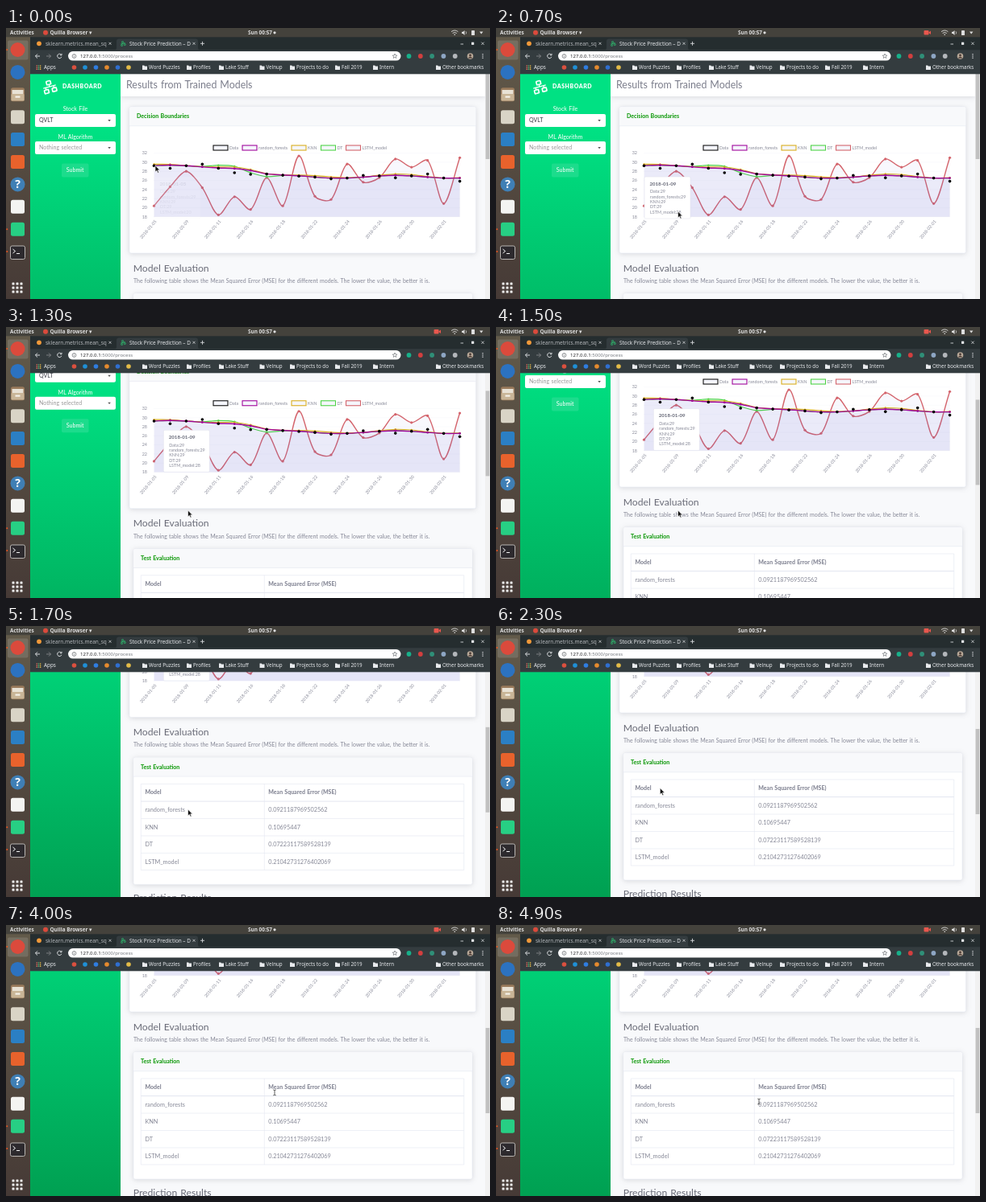
Write an HTML page that moves like this. It is 600 by 337 pixels and loops after 5000 ms.

```html
<!DOCTYPE html>
<html lang="en">
<head>
<meta charset="utf-8">
<title>Dashboard</title>
<style>
html, body { margin: 0; width: 100%; height: 100%; overflow: hidden; background: #f8f9fb; }
svg { display: block; width: 100vw; height: 100vh; }
text { white-space: pre; }
.page text { font-family: Lato, sans-serif; word-spacing: .07em; }
.ui text { font-family: "Noto Sans", "Open Sans", sans-serif; }
.card { filter: drop-shadow(0 1px 3px rgba(58, 59, 69, .17)); }
</style>
</head>
<body>
<svg id="stage" viewBox="0 0 600 337" preserveAspectRatio="none"></svg>
<script>
const LOOP = 5000, STEP = 100;
const GREY = '#858796', LINE = '#e3e6f0', GREEN = '#1a9e16', PAPER = '#f8f9fb';

// markup helpers; y of a text is the middle of its capitals
const text = (x, y, s, size, fill, more = '') =>
  `<text x="${x}" y="${(y + size * .35).toFixed(2)}" font-size="${size}" fill="${fill}" ${more}>${s}</text>`;
const rect = (x, y, w, h, fill, more = '') =>
  `<rect x="${x}" y="${y}" width="${w}" height="${h}" fill="${fill}" ${more}/>`;
const dot = (x, y, r, fill, more = '') =>
  `<circle cx="${x}" cy="${y}" r="${r}" fill="${fill}" ${more}/>`;
const path = (d, stroke, w = 1, more = '') =>
  `<path d="${d}" fill="none" stroke="${stroke}" stroke-width="${w}" ${more}/>`;
const each = (list, fn) => list.map(fn).join('');
const times = (n, fn) => Array.from({ length: n }, (_, i) => fn(i));
const MID = 'text-anchor="middle"', END = 'text-anchor="end"', BOLD = 'font-weight="800"';

const grid9 = (x, y, gap, size, fill) => times(9, i =>
  rect(x + i % 3 * gap, y + Math.floor(i / 3) * gap, size, size, fill(i % 3), 'rx=".6"')).join('');

function nodes(x, y, k, color) {
  const box = (a, b) => rect(a - 2.6, b - 2.2, 5.2, 4.4, 'none', `rx=".7" stroke="${color}" stroke-width="1.7"`);
  return `<g transform="translate(${x} ${y}) rotate(-15) scale(${k})">` +
    path('M0-3V0M-5 3V0H5V3M-8 0H8', color, 1.3) + box(0, -5) + box(-5, 5) + box(5, 5) + '</g>';
}

// ---- chart ----
const COUNT = 20, X0 = 183.5, DX = 19.95, BASE = 234.7, UNIT = 5.65;
const px = i => X0 + i * DX;
const py = v => BASE - (v - 18) * UNIT;

// a price level that drops once, around index mid, with a slow ripple
const trend = (i, mid) => 172.3 + 12.7 / (1 + Math.exp(2 * (mid - i))) - 1.8 * Math.cos(2 * Math.PI * (i - 1) / 7);
const forest = times(COUNT, i => trend(i, 6.3));
const data = times(COUNT, i => trend(i, 5.5) + 4 * Math.sin(Math.PI * i / 2) * Math.cos(Math.PI * i / 19));
const knn = forest.map((y, i) => y - 1.8 * Math.cos(.6 * (i - 5)) ** 2);
const tree = forest.map((y, i) => y + 6 * Math.sin(1.05 * (i - 5.5)) * Math.exp(-(((i - 5.5) / 2) ** 2)));
const lstm = [20.4, 24.6, 28, 24.4, 18.4, 22.4, 19.6, 26.6, 20.4, 31.4,
  22.5, 21.8, 29.6, 25.6, 26.6, 30.7, 28.9, 30.4, 20.9, 31].map(py);

function curve(ys) {
  const at = i => [px(i), ys[i]];
  const last = ys.length - 1;
  const control = (i, side) => {
    const p = at(Math.max(i - 1, 0)), c = at(i), n = at(Math.min(i + 1, last));
    const a = Math.hypot(c[0] - p[0], c[1] - p[1]), b = Math.hypot(n[0] - c[0], n[1] - c[1]);
    const f = .3 * (side < 0 ? -a : b) / (a + b);
    return [c[0] + f * (n[0] - p[0]), c[1] + f * (n[1] - p[1])];
  };
  let d = 'M' + at(0);
  for (let i = 0; i < last; i++) d += `C${control(i, 1)} ${control(i + 1, -1)} ${at(i + 1)}`;
  return d;
}
function series(ys, color, w, r) {
  const d = curve(ys);
  return `<path d="${d}V${BASE}H${X0}Z" fill="rgba(90,105,200,.042)"/>` + path(d, color, w) +
    each(ys, (y, i) => dot(px(i), y, r, color));
}

function chart() {
  let s = '';
  for (let v = 18; v <= 32; v += 2) {
    s += path(`M${X0} ${py(v)}H562.5`, '#eaecf4', .5, 'stroke-dasharray="1 1"') +
      text(175, py(v), v, 5.4, GREY, END);
  }
  const days = ['01-05', '01-09', '01-11', '01-16', '01-18', '01-22', '01-24', '01-26', '01-30', '02-01'];
  s += each(days, (d, i) => {
    const x = px(i * 2) + 2;
    return text(x, 239.5, '2018-' + d, 5.3, GREY, `${END} transform="rotate(-50 ${x} 239.5)"`);
  });
  const keys = [[257, 'Data', '#111'], [293, 'random_forests', '#a0069c'], [354, 'KNN', '#d9ae1e'],
    [390.5, 'DT', '#4fd447'], [421.5, 'LSTM_model', '#d4646c']];
  s += each(keys, ([x, name, c]) =>
    rect(x, 146, 18, 6, '#f5f6fd', `stroke="${c}" stroke-width="1.1"`) + text(x + 20, 149, name, 5.3, GREY));
  return s + series(lstm, '#d4646c', 1.4, 1.6) + series(tree, '#4fd447', 1.2, 1.2) +
    series(knn, '#d9ae1e', 1.2, 1.2) + series(forest, '#a0069c', 1.4, 1.4) +
    each(data, (y, i) => dot(px(i), y, 1.8, '#000'));
}

function tooltip() {
  return '<g id="tip">' + rect(0, 0, 57, 52, '#fff', 'rx="1.5" stroke="#dddfeb" stroke-width=".5"') +
    text(6.5, 8.5, '', 6.1, '#6e707e', `id="tipDay" ${BOLD}`) +
    times(5, i => text(7, 18.5 + i * 6.3, '', 5.4, GREY, `id="tip${i}"`)).join('') + '</g>';
}

// ---- scrolled page ----
function sidebar() {
  const select = (y, name, color) => rect(36, y, 100, 16, '#fff', 'rx="2"') +
    text(41, y + 8, name, 7.1, color) + `<path d="M126.3 ${y + 7}h3.6l-1.8 2.2z" fill="#555"/>`;
  return rect(30, 57, 112, 700, 'url(#side)') + nodes(54, 73, 1, '#fff') +
    text(70, 72.5, 'DASHBOARD', 7, '#fff', 'font-weight="900" letter-spacing=".5"') +
    text(86, 101, 'Stock File', 7.1, '#fff', MID) + select(107, 'QVLT', '#3a3b45') +
    text(86, 135.5, 'ML Algorithm', 7.1, '#fff', MID) + select(141, 'Nothing selected', '#999') +
    rect(69, 168.5, 33.5, 17, '#1cdc8c', 'rx="2"') + text(85.7, 177, 'Submit', 7.1, '#fff', MID);
}

function card(x, y, w, h, title, tx) {
  return `<g class="card">${rect(x, y, w, h, '#fff', `rx="2" stroke="${LINE}" stroke-width=".5"`)}</g>` +
    rect(x + .3, y + .3, w - .6, 23.2, PAPER, 'rx="2"') +
    path(`M${x} ${y + 23.7}H${x + w}`, LINE, .6) + text(tx, y + 12, title, 7.05, GREEN, BOLD);
}

function table() {
  const rows = [['random_forests', '0.0921187969502562'], ['KNN', '0.10695447'],
    ['DT', '0.07223117589528139'], ['LSTM_model', '0.21042731276402069']];
  const head = 384.6, rh = 21.45;
  const cells = (y, a, b, size, more) => text(172.5, y, a, size, GREY, more) + text(325.3, y, b, size, GREY, more);
  return path('M167.3 363H567.7V470H167.3ZM320.3 363V470', LINE, .6) +
    cells(373.5, 'Model', 'Mean Squared Error (MSE)', 7, BOLD) +
    each(rows, ([a, b], i) => path(`M167.3 ${head + i * rh}H567.7`, LINE, i ? .6 : 1) +
      cells(head + (i + .5) * rh, a, b, 7.25));
}

function page() {
  const heading = (y, s) => text(157.7, y, s, 12.2, '#6a6c78');
  return rect(142, 57, 452, 700, PAPER) +
    `<g class="card">${rect(142, 57, 452, 28, '#fff')}</g>` + sidebar() +
    text(149, 71, 'Results from Trained Models', 12.4, '#7b7d8b') +
    card(153, 98, 429.5, 182, 'Decision Boundaries', 162) + chart() + tooltip() +
    heading(298.3, 'Model Evaluation') +
    text(158, 314.5, 'The following table shows the Mean Squared Error (MSE) for the different models. The lower the value, the better it is.', 6.95, GREY) +
    card(158, 330, 420, 158, 'Test Evaluation', 167) + table() + heading(504.5, 'Prediction Results');
}

// ---- desktop and browser ----
function dock() {
  const at = i => 27 + i * 27.9;
  const tile = (i, c) => rect(6, at(i) - 8.5, 17, 17, c, 'rx="2.5"');
  return rect(0, 11, 30, 326, 'url(#dock)') + rect(2, 15.5, 25.5, 24, '#fff', 'rx="2" opacity=".13"') +
    dot(14.5, at(0), 9, '#db4a3c') + dot(14.5, at(1), 9, '#2c72c0') +
    tile(2, '#9a7b5c') + rect(7.5, 77, 14, 5.5, '#e9e2d5') + rect(6.5, 82, 16, 8.5, '#c9b597', 'rx="1"') +
    rect(11.5, 84.5, 6, 2.2, '#f5f1e8') +
    tile(3, '#d9d4c6') + tile(4, '#2b7fc4') + tile(5, '#e8622c') +
    dot(14.5, at(6), 9, '#3f7fb5') + text(14.5, at(6), '?', 14, '#fff', `${MID} ${BOLD}`) +
    tile(7, '#f4f4f2') + tile(8, '#27cf84') +
    rect(5.5, 271, 18, 16.5, '#2d2a2e', 'rx="2" stroke="#b8b5b2" stroke-width="1"') +
    path('M8.5 275l3 2.5l-3 2.5M13 280.5h4', '#fff', 1) +
    each([0, 8, 9], i => dot(1.3, at(i), 1, '#e95420')) + grid9(7.5, 316.5, 5, 3, () => '#eee');
}

function topBar() {
  const c = '#dedede';
  const label = (x, s) => text(x, 5.8, s, 6.4, c, 'font-weight="600"');
  return rect(0, 0, 600, 11.3, '#44423c') + label(5, 'Activities') + dot(49, 5.8, 3, '#db4a3c') +
    label(54.5, 'Quilla Browser ▾') + label(300, 'Sun 00:57') + dot(333, 5.8, 1.6, c) +
    `<g id="rec">${rect(530.5, 3, 6, 5.6, '#e8574e', 'rx="1"')}<path d="M536 5.8l3-2.2v4.4z" fill="#e8574e"/></g>` +
    path('M552 4.6q4.2-3.2 8.4 0M553.6 6.5q2.6-2 5.2 0', c, .9) + dot(556.2, 8.2, .8, c) +
    `<path d="M565 4.7h1.5l2-1.8v6l-2-1.8h-1.5z" fill="${c}"/>` + path('M570 4.2q1.6 1.7 0 3.4', c, .7) +
    rect(577, 3, 4, 6, c, 'rx=".6"') + `<path d="M587 4.6h4.4l-2.2 2.8z" fill="${c}"/>`;
}

function tabs() {
  const c = '#e8eaed', dim = '#b4b7bb';
  const cross = (x, k) => path(`M${x - k} ${19.3 - k}l${2 * k} ${2 * k}M${x - k} ${19.3 + k}l${2 * k} ${-2 * k}`, c, .7);
  return rect(30, 11, 570, 17, '#252d2f') +
    '<path d="M134 27.5q3 0 3-3v-8q0-3 3-3h95q3 0 3 3v8q0 3 3 3z" fill="#343c3f"/>' +
    dot(41, 19.3, 2.9, '#f0993a') + text(49, 19.3, 'sklearn.metrics.mean_sq', 6.5, dim) + cross(129, 1.5) +
    nodes(145, 19.3, .38, '#2fbf71') + text(153, 19.3, 'Stock Price Prediction – D', 6.4, c) + cross(233, 1.5) +
    path('M241 19.3h5M243.5 16.8v5M563.5 20h3.5', c, .8) + rect(577, 17.7, 3.2, 3.2, c) + cross(591, 1.7);
}

function toolbar() {
  const c = '#e8eaed', ink = '#5f6368';
  const addons = ['#18b08a', '#d23f3f', '#2f8f78', '#8ea6c4', '#b4b7bb'];
  return rect(30, 27.3, 570, 30, '#343c3f') + rect(77, 29, 412.5, 11.6, '#fff', 'rx="5.8"') +
    path('M42 35h-5.5M39 32.4l-2.6 2.6l2.6 2.6', c, .9) +
    path('M50 35h5.5M53 32.4l2.6 2.6l-2.6 2.6', '#85878a', .9) +
    path('M68.6 33.4a2.7 2.7 0 1 0 .3 2.4M69 31.8v2h-2', c, .9) +
    dot(84.5, 35, 2.4, 'none', `stroke="${ink}" stroke-width=".7"`) + path('M84.5 34.7v1.6M84.5 33.4v.6', ink, .7) +
    text(92, 34.8, '127.0.0.1<tspan fill="#777b80">:5000/process</tspan>', 6.05, '#202124') +
    path('M482 32l.8 2 2.1.1-1.7 1.3.6 2.1-1.8-1.2-1.8 1.2.6-2.1-1.7-1.3 2.1-.1z', ink, .6) +
    each(addons, (a, i) => dot(499.5 + i * 14.3, 35, 2.9, a)) +
    dot(575.5, 35, 3.8, '#b8a898') + dot(575.5, 34, 1.4, '#4b3b35') +
    '<path d="M572.9 37.6a2.7 2.4 0 0 1 5.2 0z" fill="#4b3b35"/>' +
    times(3, i => dot(591, 32.7 + i * 2.3, .7, c)).join('');
}

function bookmarks() {
  const c = '#e8eaed';
  const sites = ['#d9503f', '#1f8fd6', '#2f7de0', '#e58a2e', '#2f6fd0', '#e3bb48'];
  const folders = [[177, 'Word Puzzles'], [232, 'Profiles'], [272, 'Lake Stuff'], [322.5, 'Velnup'],
    [360, 'Projects to do'], [416, 'Fall 2019'], [463, 'Intern'], [541, 'Other bookmarks']];
  return grid9(37.5, 46.2, 2.2, 1.5, i => ['#ea6a5c', '#5fb878', '#e3bb48'][i]) + text(47, 49, 'Apps', 6.3, c) +
    each(sites, (s, i) => dot(84.5 + i * 13.5, 49, 2.8, s)) +
    each(folders, ([x, name]) => `<path d="M${x - 8} 46.6h2.2l.8.9h3v4.4h-6z" fill="${c}"/>` +
      text(x, 49, name, 6.2, c));
}

document.getElementById('stage').innerHTML = `
  <defs>
    <linearGradient id="side" x1="0" y1="0" x2="0" y2="1">
      <stop offset=".1" stop-color="#00e183"/><stop offset="1" stop-color="#007632"/>
    </linearGradient>
    <linearGradient id="dock" x1="0" y1="0" x2="0" y2="1">
      <stop offset="0" stop-color="#625a4a"/><stop offset="1" stop-color="#463a36"/>
    </linearGradient>
    <clipPath id="view">${rect(30, 57, 564, 280, '#000')}</clipPath>
  </defs>
  <g class="page" clip-path="url(#view)"><g id="scroll">${page()}</g></g>
  ${rect(594, 57, 6, 280, '#f1f1f1')}${rect(594.6, 57, 4.8, 106, '#c1c1c1', 'id="thumb"')}
  <g class="ui">${tabs()}${toolbar()}${bookmarks()}${dock()}${topBar()}</g>
  <path id="arrow" d="M0 0V8l1.9-1.7 1.3 2.9 1.3-.6-1.3-2.8h2.5z" fill="#111" stroke="#fff" stroke-width=".6"/>
  <path id="beam" d="M-1.7-3.4q1.7 0 1.7 1V2.4q0 1 1.7 1M1.7-3.4q-1.7 0-1.7 1M0 2.4q0 1-1.7 1" fill="none" stroke="#333" stroke-width=".8"/>`;

// ---- motion ----
const ramp = (t, from, to) => Math.min(1, Math.max(0, (t - from) / (to - from)));
const smooth = (t, from, to) => { const u = ramp(t, from, to); return u * u * (3 - 2 * u); };
const mix = (a, b, u) => a + (b - a) * u;
const wave = u => Math.sin(Math.PI * u);

function pointer(t) {
  if (t < 2200) {
    const u = ramp(t, 0, 600);
    return [mix(185, 225.5, u), mix(171, 228, u)];
  }
  if (t < 3400) { // a loop up over the heading and back
    const u = ramp(t, 2200, 3200);
    return [226 - 27 * wave(2 * u) - 22 * wave(u), mix(228, 201, u) - 77 * wave(u)];
  }
  const swing = ramp(t, 4000, 4900);
  return [mix(226, 333, smooth(t, 3400, 4000)) - 7 * swing,
    mix(201, 219.5, ramp(t, 3400, 4900)) - 16 * wave(2 * swing)];
}

// three wheel strokes, each faster than the one before
const scrolled = t => 27.5 * smooth(t, 700, 1100) + 53.5 * smooth(t, 1100, 1500) + 91 * smooth(t, 1500, 1735);

const el = id => document.getElementById(id);
const move = (id, x, y) => el(id).setAttribute('transform', `translate(${x} ${y})`);
const show = (id, on) => el(id).setAttribute('visibility', on ? 'visible' : 'hidden');
const tipNames = ['Data', 'random_forests', 'KNN', 'DT', 'LSTM_model'];

function draw(t) {
  const [x, y] = pointer(t), top = scrolled(t), slide = smooth(t, 700, 1000);
  move('scroll', 0, -top);
  move('thumb', 0, top * .413);
  move('tip', 184 + 11.3 * slide, 185 - 2.4 * slide);
  el('tip').setAttribute('opacity', t < 1900 ? mix(.12, 1, ramp(t, 0, 200)) : t < 2100 ? .5 : 0);
  const day = Math.min(2, Math.floor(t / 200));
  el('tipDay').textContent = '2018-01-0' + [5, 8, 9][day];
  tipNames.forEach((name, i) => {
    el('tip' + i).textContent = name + ':' + (i < 4 ? 29 : 20 + 4 * day);
  });
  const overText = t > 2200 && (y < 148 || x > 322);
  show('arrow', !overText);
  show('beam', overText);
  move('arrow', x, y);
  move('beam', x, y);
  show('rec', t >= STEP);
}

function frame() {
  const t = performance.now() % LOOP;
  draw(Math.floor(t / STEP) * STEP);
  requestAnimationFrame(frame);
}
frame();
</script>
</body>
</html>
```
